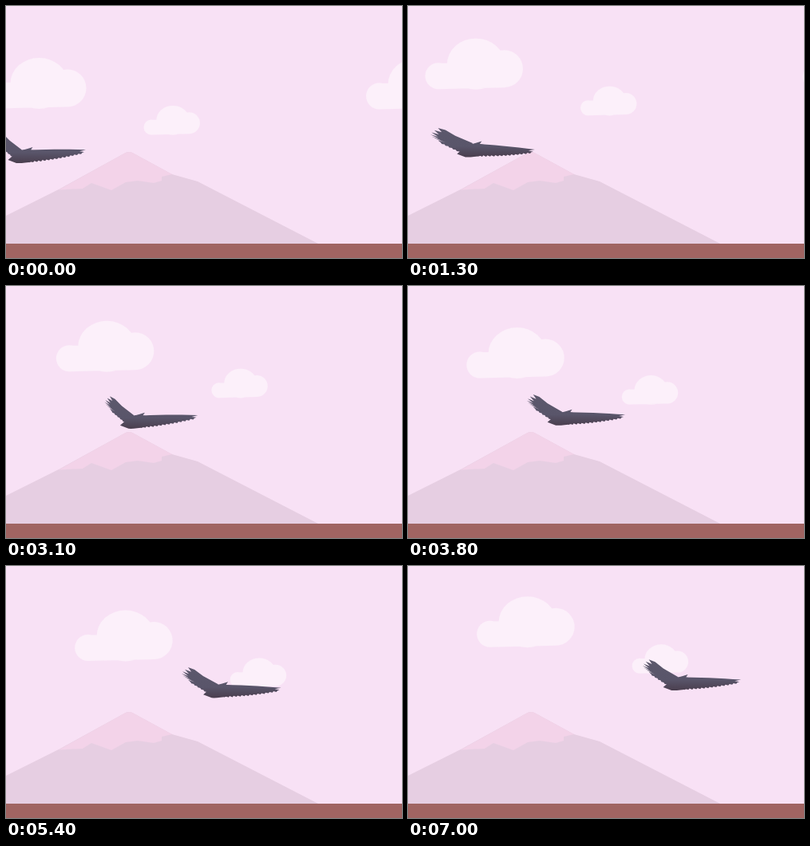
These frames come from a looping animation (496 px wide and 316 px high, 7.1 s). An HTML page with a canvas:

```html
<!DOCTYPE html>
<html lang="en">
<head>
<meta charset="utf-8">
<title>Bird over the mountain</title>
<style>
html, body { margin: 0; width: 100%; height: 100%; overflow: hidden; background: #f8e1f5; }
canvas { display: block; }
</style>
</head>
<body>
<canvas id="stage" width="496" height="316"></canvas>
<script>
const ctx = document.getElementById('stage').getContext('2d');
const LOOP = 7100, STEP = 100, TURN = 2 * Math.PI;

const mountain = new Path2D('M0 263 L66 230 L146 186 Q154 180 162 186 L208 211 L240 220 L391 298 H0 Z');
const snow = new Path2D('M66 230.5 L146 186 Q154 180 162 186 L208 211 L195 214 V219 L185 222 ' +
  'L165 219 L150 221 L132 231 L107 222 L96 229 Z');
const cloud = new Path2D('M16 63.5 V31 H99 V61.5 Z');
const body = new Path2D('M-12.5 -4 Q-6 -10 1 -15 L12 -18 L18.5 -20 L16 -16.5 L24 -15 L19 -2 Q6 0.5 -2 0 Z');

function addLobe(x, y, rx, ry) {
  const lobe = new Path2D();
  lobe.ellipse(x, y, rx, ry, 0, 0, TURN);
  cloud.addPath(lobe);
}
addLobe(16.5, 47, 16.5, 16.5);
addLobe(63.5, 32, 36, 32);
addLobe(99, 38, 23.5, 23.5);

function fillPath(path, color) {
  ctx.fillStyle = color;
  ctx.fill(path);
}

function fillPoints(points, color) {
  const path = new Path2D();
  points.forEach(([x, y]) => path.lineTo(x, y));
  path.closePath();
  fillPath(path, color);
}

function drawCloud(x, y, scale) {
  ctx.save();
  ctx.translate(x, y);
  ctx.scale(scale, scale);
  fillPath(cloud, '#fcf0fa');
  ctx.restore();
}

function makeLeftWing() {
  const points = [[6, -17], [-12.5, -27.4]];
  // Spread flight feathers, then the serrated trailing edge.
  for (let i = 0; i <= 6; i++) {
    const x = -31 - 8 * Math.sin(i / 6 * Math.PI), y = -38.5 + i * 2.6;
    points.push([x + 8, y + 3], [x, y]);
  }
  for (let i = 0; i <= 5; i++) {
    const x = -28 + i * 4, y = -20 + i * 2.5;
    points.push([x, y], [x + 1, y + 1.8]);
  }
  return [...points, [4, -4]];
}

function makeRightWing() {
  const points = [];
  for (let x = 5; x <= 85; x += 10) points.push([x, -16.5 + 3.5 * (x / 85) ** 2]);
  points.push([77, -11.5], [83, -10.3]);
  for (let x = 79; x > 10; x -= 5) {
    const y = -1 - x * x / 830;
    points.push([x + 1.5, y - 1], [x, y + 0.7]);
  }
  return points;
}

const leftWing = makeLeftWing(), rightWing = makeRightWing();
const shade = ctx.createLinearGradient(0, -38, 0, 0);
shade.addColorStop(0, '#5c586c');
shade.addColorStop(0.65, '#59556a');
shade.addColorStop(1, '#4a3e4e');

function drawBird(t) {
  const lift = Math.cos(TURN * (t + 0.15) / 3.2);
  ctx.save();
  ctx.translate(15 + 45.3 * t, 197 - 5.86 * t);
  fillPoints(leftWing.map(([x, y]) => [x * (1 - 0.18 * lift), y + 0.07 * lift * x]), shade);
  fillPoints(rightWing.map(([x, y]) => [x, y - 0.055 * lift * Math.max(0, x - 14)]), shade);
  fillPath(body, shade);
  ctx.restore();
}

function draw(now) {
  const t = Math.floor(now % LOOP / STEP) * STEP / 1000;
  // Clouds ease to the right while bobbing up and down.
  const x = 109.5 * (1 - Math.abs(1 - t / 6.2) ** 2.15);
  const y = -18 + 11 * Math.cos(TURN * (t - 4.78) / 5.6) + 11.3 * Math.exp(-1.5 * t);

  ctx.fillStyle = '#f8e1f5';
  ctx.fillRect(0, 0, 496, 316);
  fillPath(mountain, '#e6cee2');
  fillPath(snow, '#f3d3e9');
  ctx.fillStyle = '#a06462';
  ctx.fillRect(0, 298, 496, 18);
  drawCloud(x - 22, y + 65, 1);
  drawCloud(x + 172.5, y + 125, 0.575);
  drawCloud(x + 451, y + 66, 1);
  drawBird(t);
}

const start = performance.now();
function tick() {
  draw(performance.now() - start);
  requestAnimationFrame(tick);
}
tick();
</script>
</body>
</html>
```
